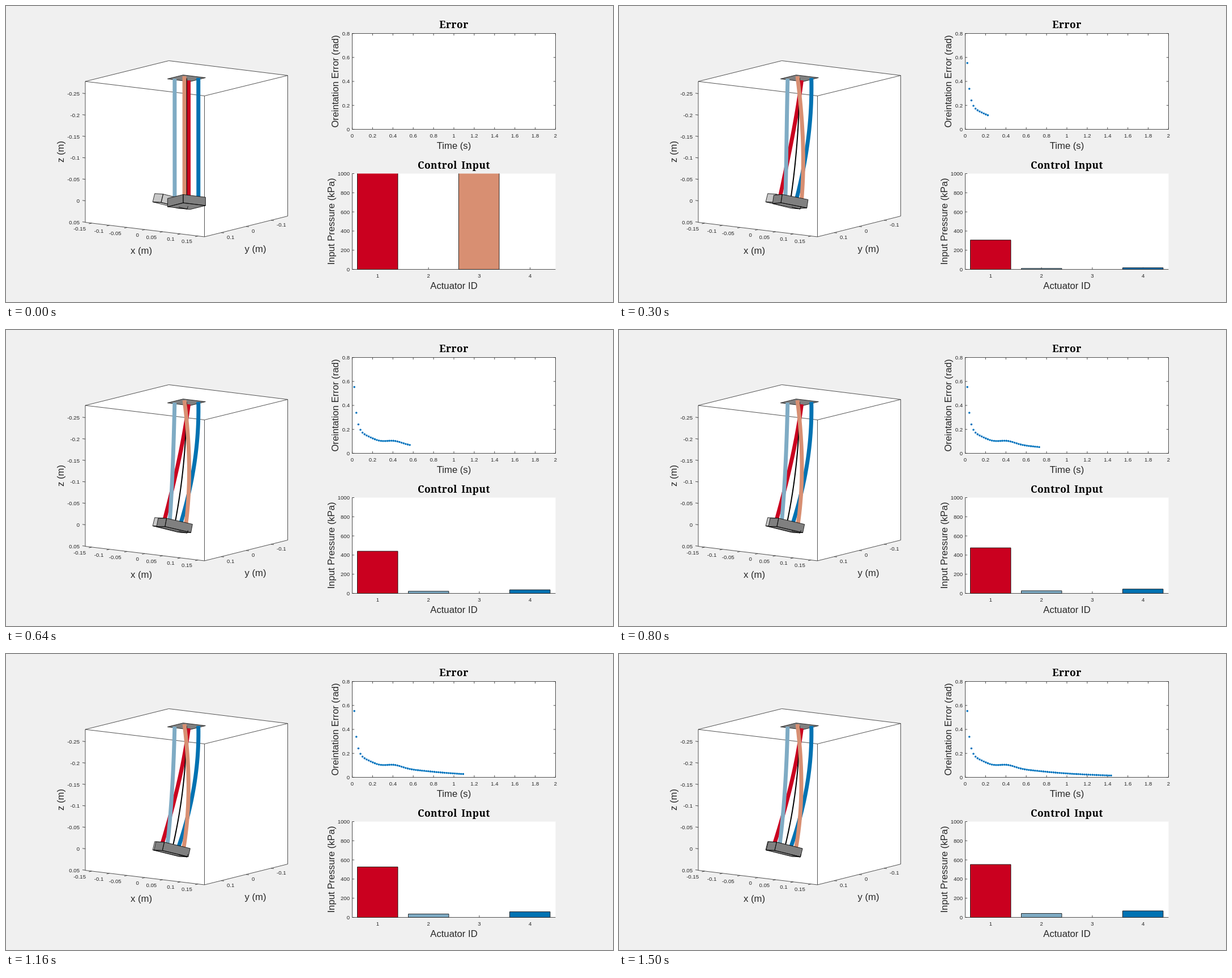
Recreate the animation shown at these times as an HTML page. Size 1072x522 px, loop 1520 ms.

```html
<!DOCTYPE html>
<html lang="en">
<head>
<meta charset="utf-8">
<title>Arm control</title>
<style>
html, body { margin: 0; width: 100%; height: 100%; overflow: hidden; background: #f0f0f0; }
svg { display: block; width: 1072px; height: 522px; font-family: "Liberation Sans", Arial, sans-serif; fill: #262626; }
.tick { font-size: 9.6px; }
.label { font-size: 16.7px; }
.title { font: bold 17.4px "Noto Serif", serif; letter-spacing: .45px; word-spacing: 2.5px; fill: #000; }
.axis { fill: none; stroke: #262626; stroke-width: .8; }
.solid { stroke: #000; stroke-width: .8; stroke-linejoin: round; }
</style>
</head>
<body>
<svg id="stage" viewBox="0 0 1072 522"></svg>
<script>
const stage = document.getElementById('stage');
const RED = '#ca001f', SKY = '#7fabc4', SAND = '#d88f72', BLUE = '#0072b2';
const STEPS = 71, LOOP = 1520;

function add(tag, attrs, text) {
  const el = document.createElementNS('http://www.w3.org/2000/svg', tag);
  for (const name in attrs) el.setAttribute(name, attrs[name]);
  if (text !== undefined) el.textContent = text;
  return stage.appendChild(el);
}
const path = (d, attrs) => add('path', { d, ...attrs });
const line = (x, y, dx, dy) => path(`M${x} ${y}l${dx} ${dy}`, { class: 'axis' });
const poly = pts => 'M' + pts.map(p => p[0].toFixed(2) + ' ' + p[1].toFixed(2)).join('L');

function write(text, x, y, cls, anchor = 'middle', turn = 0) {
  const attrs = { x, y, class: cls, 'text-anchor': anchor };
  if (turn) attrs.transform = `rotate(${turn} ${x} ${y})`;
  add('text', attrs, text);
}
const tickText = (v, x, y, anchor) => write(String(+v.toFixed(2)), x, y + 3.4, 'tick', anchor);

// Control response: a fast and a slow decay with a short ripple between them.
const decay = (k, tau) => Math.exp(-k / tau);
const slow = k => decay(k, 28);
const fast = k => .85 * decay(k, 1.2);
const ripple = k => .017 * Math.sin((k - 17) * Math.PI / 11) * Math.exp(-(((k - 17) / 9) ** 2));

const errorAt = k => .19 * slow(k) + fast(k) + ripple(k);
const sideGain = k => 1 - decay(k, 55);
const pressure = [
  k => 583 - 388 * slow(k) + 1400 * ripple(k) + 3500 * fast(k),
  k => 57 * sideGain(k),
  k => 3500 * fast(k) - 50,
  k => 94 * sideGain(k)
];
const poseAt = k => ({
  shift: -26.4 + 18 * slow(k) + 8.4 * decay(k, 4.5) + 150 * ripple(k),
  yaw: 73 * (1 - decay(k, 1.4)),
  tilt: 8.9 - 2.6 * slow(k) - 6.3 * decay(k, 4.5)
});

// Projection of a point on a horizontal circle, relative to its centre.
const CX = 318.8, TOP = 127.5, DROP = 210.8, PLATE = .0464, TUBE = .029;
const CORNERS = [45, 135, 225, 315];
function around(deg, radius) {
  const a = deg * Math.PI / 180, c = Math.cos(a) * radius, s = Math.sin(a) * radius;
  return [601 * c - 420 * s, 73 * c + 105 * s];
}
function armPoint(angle, radius, s, pose) {
  const [x, y] = around(angle + pose.yaw * s, radius);
  const lift = pose.tilt * s * Math.cos((angle - 45) * Math.PI / 180) * radius / PLATE;
  return [CX + pose.shift * s * s + x, TOP + DROP * s + pose.shift * .05 * s * s + y - lift];
}
function tubePath(angle, radius, pose) {
  const pts = [];
  for (let i = 0; i <= 24; i++) pts.push(armPoint(angle, radius, i / 24, pose));
  return poly(pts);
}
function platePath(pose) {
  const upper = CORNERS.map(a => armPoint(a, PLATE, 1, pose));
  const lower = upper.map(([x, y]) => [x + pose.shift * .14, y + 14.7]);
  let d = poly(lower) + 'Z';
  for (let i = 0; i < 4; i++) {
    const j = (i + 1) % 4;
    if (upper[j][0] > upper[i][0]) d += poly([upper[i], upper[j], lower[j], lower[i]]) + 'Z';
  }
  return d;
}

// 3D axes
path('M140 133L287.5 96.5L497.5 122.5V370.5L350.5 407L140 381.5Z', { class: 'axis', style: 'fill:#fff' });
path('M140 133L350.5 158.5L497.5 122.5M350.5 158.5V407', { class: 'axis' });
for (let i = 0; i < 7; i++) {
  const zy = 154.5 + 37.8 * i, x = 151.4 + 31.3 * i, xy = 382.9 + 3.78 * i;
  line(140, zy, -5, -.7);
  tickText(-.25 + .05 * i, 130, zy, 'end');
  line(x, xy, -5, 1.2);
  tickText(-.15 + .05 * i, 141 + 31.3 * i, 393 + 3.6 * i, 'end');
}
for (let i = 0; i < 3; i++) {
  const x = 380 + 44 * i, y = 399.7 - 10.95 * i;
  line(x, y, 5, .6);
  tickText(.1 - .1 * i, x + 10, y + 8, 'start');
}
write('x (m)', 239, 436.5, 'label');
write('y (m)', 440.5, 434, 'label');
write('z (m)', 102, 257, 'label', 'middle', -90);

// Arm
const goal = { shift: -25.8, yaw: 73, tilt: 8.9 };
path(poly(CORNERS.map(a => armPoint(a, PLATE, 0, goal))) + 'Z', { class: 'solid', fill: '#808080' });
const tube = (angle, radius, stroke, width = 7) =>
  ({ angle, radius, el: path('', { fill: 'none', stroke, 'stroke-width': width }) });
const tubes = [
  tube(45, TUBE, RED), tube(315, TUBE, BLUE), tube(135, TUBE, SKY),
  tube(0, 0, '#000', 2), tube(225, TUBE, SAND)
];
path(platePath(goal), { class: 'solid', fill: '#c8c8c8' });
const plate = path('', { class: 'solid', fill: '#808080' });
path('M305 354.5L320 358L321.4 353', { class: 'solid', fill: 'none' });

// Error chart
const X0 = 611.5, W = 359, E0 = 217.5, U0 = 464.5, H = 169;
add('rect', { x: X0, y: E0 - H, width: W, height: H, class: 'axis', style: 'fill:#fff' });
for (let i = 0; i <= 10; i++) {
  const x = X0 + W / 10 * i;
  line(x, E0, 0, -3.6);
  line(x, E0 - H, 0, 3.6);
  tickText(.2 * i, x, 228.3);
}
for (let i = 0; i <= 4; i++) {
  const y = E0 - H / 4 * i;
  line(X0, y, 3.6, 0);
  line(X0 + W, y, -3.6, 0);
  tickText(.2 * i, 607, y, 'end');
}
write('Error', 791, 39, 'title');
write('Time (s)', 791, 251.7, 'label');
write('Oreintation Error (rad)', 587, 133, 'label', 'middle', -90);
const dots = [];
for (let k = 1; k <= STEPS; k++) {
  dots.push(add('circle', { cx: X0 + W / 99 * k, cy: E0 - errorAt(k) * H / .8, r: 1.8, fill: '#0072bd' }));
}

// Control chart
add('rect', { x: X0, y: U0 - H, width: W, height: H, fill: '#fff' });
add('clipPath', { id: 'chart' }).append(add('rect', { x: X0, y: U0 - H, width: W, height: H + 1 }));
for (let i = 0; i <= 5; i++) {
  const y = U0 - H / 5 * i;
  line(X0, y, 3.6, 0);
  tickText(200 * i, 607, y, 'end');
}
const slot = W / 4;
const bars = [RED, SKY, SAND, BLUE].map((fill, i) => {
  const x = X0 + slot * (i + .5);
  line(x, U0, 0, -3.6);
  tickText(i + 1, x, 475.3);
  const left = Math.floor(x - slot * .4) + .5;
  return add('rect', { x: left, width: 71.5, class: 'solid', fill, 'clip-path': 'url(#chart)' });
});
path(`M${X0} ${U0 - H}V${U0}H${X0 + W}`, { class: 'axis' });
write('Control Input', 791, 286.5, 'title');
write('Actuator ID', 791, 498.5, 'label');
write('Input Pressure (kPa)', 580, 380, 'label', 'middle', -90);

function render(time) {
  const t = time % LOOP;
  const k = t < 100 ? 0 : Math.min(STEPS, Math.floor((t - 100) / 20) + 1);
  const pose = poseAt(k);
  for (const { angle, radius, el } of tubes) el.setAttribute('d', tubePath(angle, radius, pose));
  plate.setAttribute('d', platePath(pose));
  dots.forEach((dot, i) => dot.setAttribute('visibility', i < k ? 'visible' : 'hidden'));
  bars.forEach((bar, i) => {
    const height = Math.max(0, pressure[i](k)) * H / 1000;
    bar.setAttribute('y', U0 - height);
    bar.setAttribute('height', height);
  });
}

const start = performance.now();
function loop() {
  render(performance.now() - start);
  requestAnimationFrame(loop);
}
loop();
</script>
</body>
</html>
```
